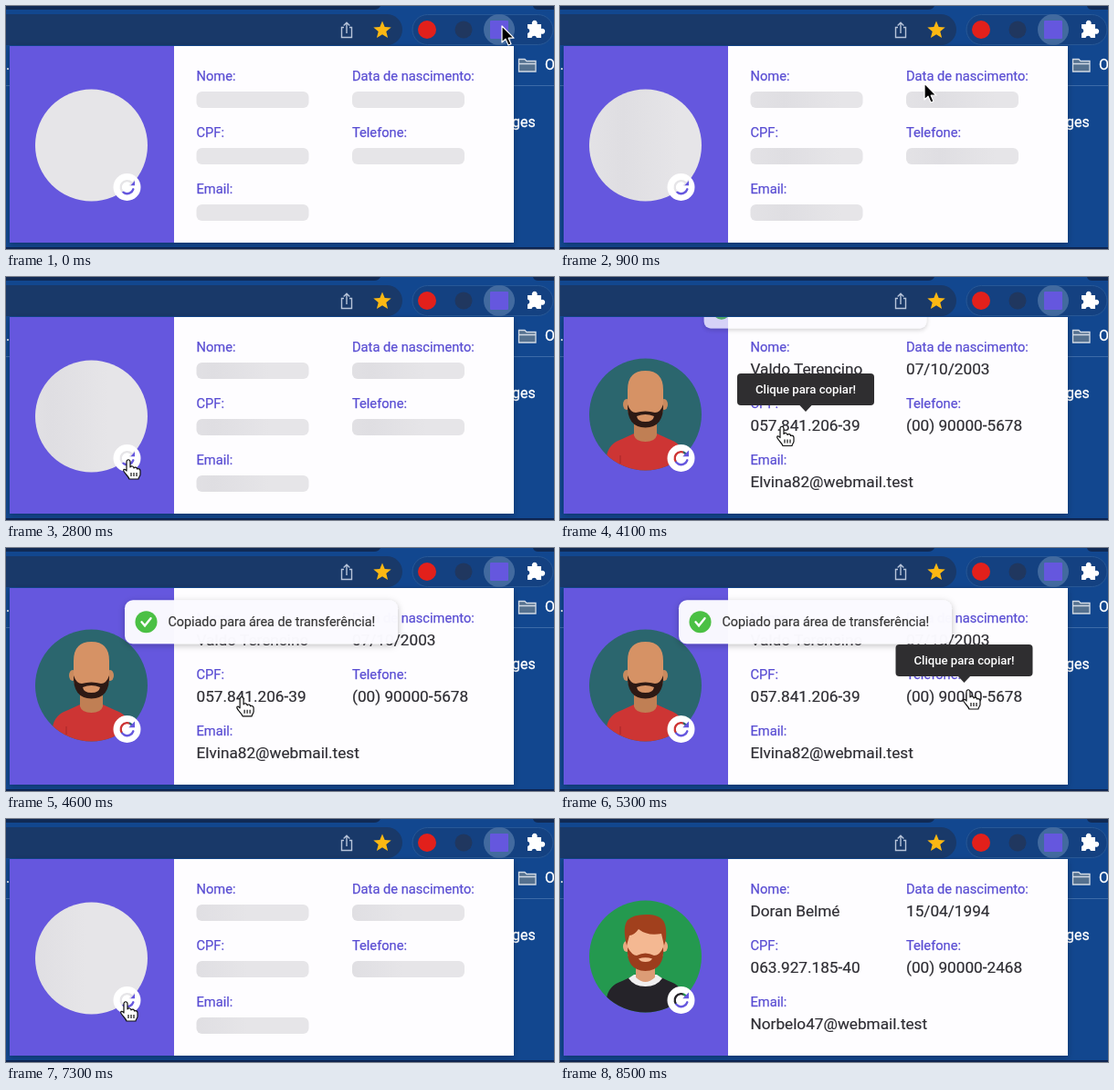
Recreate the animation shown at these times as an HTML page. Size 600x267 px, loop 8.6 s.

```html
<!DOCTYPE html>
<html lang="pt-BR">
<head>
<meta charset="utf-8">
<title>Gerador de dados</title>
<style>
  html, body { margin: 0; width: 100%; height: 100%; overflow: hidden; background: #12478f; }
  svg { display: block; width: 100vw; height: 100vh; font-family: Roboto, sans-serif; }
  .label { font-size: 14.67px; fill: #5a4ed3; stroke: #5a4ed3; stroke-width: .25px; }
  .value { font-size: 17.2px; fill: #2e2d33; stroke: #2e2d33; stroke-width: .2px; }
  .page { font: 16px Roboto, sans-serif; fill: #fff; stroke: #fff; stroke-width: .3px; }
</style>
</head>
<body>
<svg viewBox="0 0 600 267">
  <defs>
    <clipPath id="avatarClip"><circle cx="93.5" cy="151" r="61.5"/></clipPath>
    <clipPath id="popupClip"><rect x="4" y="44" width="552" height="216"/></clipPath>
    <mask id="reloadMask">
      <circle cx="132.5" cy="199" r="15" fill="#fff"/>
      <path d="M139.3 201.3A7 7 0 1 1 137.6 194.2" fill="none" stroke="#000" stroke-width="2.4" stroke-linecap="round"/>
      <path d="M141 190.500V197.200H134.300Z"/>
    </mask>
    <linearGradient id="shimmer">
      <stop stop-color="#e6e5e8"/><stop offset=".5" stop-color="#dfdee2"/><stop offset="1" stop-color="#e6e5e8"/>
    </linearGradient>
    <filter id="shadow" x="-20%" y="-40%" width="140%" height="200%">
      <feDropShadow dx="0" dy="2" stdDeviation="3.5" flood-color="#000" flood-opacity=".25"/>
    </filter>
    <!-- shoulders take the current colour -->
    <path id="torso" d="M51 215V197Q53 183 68 178L81 172H106L119 178Q134 183 136 197V215Z" fill="currentColor"/>
    <g id="sweater">
      <use href="#torso"/>
      <path d="M81 171L75 175Q81 184 93.500 184Q106 184 112 175L106 171Z" fill="#f1eff0"/>
    </g>
  </defs>

  <!-- browser chrome -->
  <rect width="600" height="267" fill="#12478f"/>
  <path d="M0 0H410Q408 4 403 4H0ZM577 0H600V4H583Q578 4 577 0Z" fill="#102a55"/>
  <rect x="-30" y="9" width="464" height="34" rx="17" fill="#193969"/>
  <rect x="445" y="9.5" width="154" height="33" rx="16.5" fill="#144181" stroke="#285896"/>
  <path d="M370 23.500H367.500V34.500H378.500V23.500H376M373 30V18.500M369.700 21.500L373 18.200L376.300 21.500" fill="none" stroke="#b7c4d9" stroke-width="1.4"/>
  <path d="M412 16.500L414.700 23L421.700 23.500L416.300 28L418.100 35L412 31.200L405.900 35L407.700 28L402.300 23.500L409.300 23Z" fill="#fcb813"/>
  <circle cx="461" cy="26" r="10" fill="#e2201b"/>
  <circle cx="501" cy="26" r="9.500" fill="#20375f"/>
  <circle cx="540" cy="26" r="17" fill="#426a9f"/>
  <rect x="530" y="16" width="20" height="20" rx="1" fill="#6557de"/>
  <path d="M572 20H576A3 3 0 1 1 581.500 20H586V25A3 3 0 1 1 586 30.500V35H581A2.800 2.800 0 0 0 575.500 35H571V30A2.800 2.800 0 0 0 571 24.500V20Z" fill="#fff"/>
  <path d="M0 87.500H600" stroke="#3d6ba8"/>
  <path d="M561.500 72V58.500H568L570 60.500H580V72ZM561.500 63.500H580" fill="#55718f" stroke="#d2dae5" stroke-width="1.3"/>
  <text class="page" x="590" y="70">O</text>
  <text class="page" x="554" y="133">ges</text>
  <text class="page" x="0" y="70">.</text>
  <rect y="265" width="600" height="2" fill="#0d2552"/>

  <!-- popup -->
  <rect x="4" y="44" width="552" height="216" fill="#fefdff" filter="url(#shadow)"/>
  <rect x="4" y="44" width="180" height="216" fill="#6557de"/>
  <g id="labels"></g>
  <g id="skeleton" fill="url(#shimmer)"></g>
  <g id="values"></g>

  <g clip-path="url(#avatarClip)">
    <g class="avatar">
      <rect x="30" y="88" width="128" height="128" fill="#2b666e"/>
      <use href="#sweater" color="#221815"/>
      <path d="M83 155H104V174Q93.500 184 83 174Z" fill="#d98d5c"/>
      <ellipse cx="74" cy="142" rx="4" ry="6" fill="#e59f6c"/><ellipse cx="113" cy="142" rx="4" ry="6" fill="#e59f6c"/>
      <path d="M75 118H112V146Q108 169 93.500 169Q79 169 75 146Z" fill="#f0ab78"/>
      <path d="M74 138Q66 124 70 114L67 112L74 107L71 103L80 103L82 96L89 100L96 95L98 100L108 98L108 104L116 106L114 110L120 115L116 119Q118 129 113 138L110 126L104 130L99 123L92 130L87 124L77 130Z" fill="#221713"/>
      <g fill="#f3c09a" stroke="#5b3a27" stroke-width="1.500"><circle cx="85" cy="140" r="6.500"/><circle cx="102.500" cy="140" r="6.500"/><path d="M91.500 139Q93.700 137.500 96 139M75 138H79M109 138H113"/></g>
    </g>
    <g class="avatar">
      <rect x="30" y="88" width="128" height="128" fill="#2b666e"/>
      <use href="#torso" color="#cd3534"/>
      <path d="M81 155H106V174Q104 181 93.500 181Q83 181 81 174Z" fill="#c07f54"/>
      <ellipse cx="73" cy="140" rx="4" ry="6" fill="#c98a5e"/><ellipse cx="114" cy="140" rx="4" ry="6" fill="#c98a5e"/>
      <path d="M74 124Q74 103 93.500 103Q113 103 113 124V146Q109 165 93.500 165Q78 165 74 146Z" fill="#d69265"/>
      <path d="M74 140Q77 149 83 149Q93.500 146 104 149Q110 149 113 140Q114 165 93.500 165.500Q73 165 74 140Z" fill="#2d1914"/>
      <path d="M84 153Q93.500 149 103 153Q102 159 93.500 159Q85 159 84 153Z" fill="#d69265"/>
      <path d="M66 205V196M121 205V196" stroke="#a82729"/>
    </g>
    <g class="avatar">
      <rect x="30" y="88" width="128" height="128" fill="#24994f"/>
      <use href="#sweater" color="#252329"/>
      <path d="M83 155H104V174Q93.500 184 83 174Z" fill="#dc9c76"/>
      <ellipse cx="73" cy="140" rx="4" ry="6" fill="#eaa982"/><ellipse cx="114" cy="140" rx="4" ry="6" fill="#eaa982"/>
      <path d="M74 120H113V149Q107 165 93.500 165Q80 165 74 149Z" fill="#f4b892"/>
      <path d="M73 139Q68 119 74 111Q81 104 98 105Q115 106 116 121Q117 131 114 139L111 126Q96 129 86 121Q81 128 76 128Z" fill="#a1401d"/>
      <path d="M74 141Q79 150 84 150Q93.500 145 103 150Q109 150 113 141Q115 166 93.500 167Q72 166 74 141Z" fill="#9b3d1c"/>
      <path d="M86 153.500Q93.500 151 101 153.500Q99 157 93.500 157Q88 157 86 153.500Z" fill="#f4b892"/>
    </g>
  </g>
  <rect x="117" y="184" width="31" height="31" fill="#fff" mask="url(#reloadMask)"/>

  <!-- overlays -->
  <g clip-path="url(#popupClip)">
    <g id="toast">
      <rect x="-149.500" y="-24" width="299" height="48" rx="9" fill="#fbfaff" fill-opacity=".98" filter="url(#shadow)"/>
      <circle cx="-126" cy="0" r="12" fill="#4bc044"/>
      <path d="M-131 0L-127.500 4L-121 -4" fill="none" stroke="#fff" stroke-width="2.400" stroke-linecap="round"/>
      <text x="-102" y="4.500" font-size="14.350" fill="#363636" stroke="#363636" stroke-width=".2">Copiado para área de transferência!</text>
    </g>
  </g>
  <g id="tooltip">
    <rect x="-75" y="106" width="150" height="35" rx="4" fill="#2f2e30"/>
    <path d="M-7 140.500H7L0 148Z" fill="#2f2e30"/>
    <text y="127.800" font-size="13.150" font-weight="500" fill="#fff" text-anchor="middle">Clique para copiar!</text>
  </g>
  <g id="cursor" stroke-linejoin="round">
    <path id="arrow" d="M0 0V18L4 14.200L7 21L10 19.700L7.200 13.200H13Z" stroke="#fff" stroke-width="1.200"/>
    <path id="hand" d="M-2 2C-2 -1 2 -1 2 2V8C3 6 6 7 6 9C7 7.500 9.500 8 9.500 10C11 9 13 10 13 12V16C13 18 11 19 11 21H1C0 18 -3 16 -5 12.500C-6 10 -4 9.500 -2 12ZM3 14V18M6 14V18M9 14V18" fill="#fff" stroke="#111" stroke-width="1.200"/>
  </g>
</svg>
<script>
const LOOP = 8600, STEP = 100;
const $ = id => document.getElementById(id);
const show = (el, visible) => el.style.display = visible ? '' : 'none';
const clamp = x => Math.max(0, Math.min(1, x));
const smooth = p => p * p * (3 - 2 * p);

const fields = [
  ['Nome:', 208.5, 82], ['Data de nascimento:', 379, 82],
  ['CPF:', 208.5, 144], ['Telefone:', 379, 144], ['Email:', 208.5, 206]
];
const people = [
  ['Marlino Endaro', '28/06/1987', '048.216.930-57', '(00) 90000-1234', 'Nomira.Gandon@email.test'],
  ['Valdo Terencino', '07/10/2003', '057.841.206-39', '(00) 90000-5678', 'Elvina82@webmail.test'],
  ['Doran Belmé', '15/04/1994', '063.927.185-40', '(00) 90000-2468', 'Norbelo47@webmail.test']
];
// [start, person]; -1 means loading
const states = [[0, -1], [1000, 0], [2300, -1], [3300, 1], [6900, -1], [7800, 2]];
// cursor hotspot: [time, x, y]
const path = [
  [0, 543, 22], [500, 543, 22], [1500, 134, 201], [3300, 134, 201],
  [3800, 243, 164.5], [4500, 243, 164.5], [5100, 447, 156], [5600, 447, 156],
  [6400, 131, 201], [7500, 131, 201], [8100, 620, 120], [LOOP, 620, 120]
];
// [start, end, centre x]
const tips = [[3700, 4600, 269], [4900, 5750, 442.5]];
const TOAST_IN = 4050, TOAST_OUT = 6050;

$('labels').innerHTML = fields.map(([text, x, y]) =>
  `<text class="label" x="${x}" y="${y}">${text}</text>`).join('');
$('values').innerHTML = fields.map(([, x, y]) =>
  `<text class="value" x="${x}" y="${y + 25.4}"></text>`).join('');
$('skeleton').innerHTML = '<circle cx="93.5" cy="153" r="61.5"/>' + fields.map(([, x, y]) =>
  `<rect x="${x}" y="${y + 12}" width="123" height="18" rx="6"/>`).join('');
const valueTexts = [...$('values').children];
const avatars = document.querySelectorAll('.avatar');

function drawProfile(t) {
  const [start, person] = states.findLast(s => s[0] <= t);
  show($('skeleton'), person < 0);
  avatars.forEach((avatar, i) => show(avatar, i === person));
  valueTexts.forEach((el, i) => el.textContent = person < 0 ? '' : people[person][i]);
  const shift = ((t - start) % 1000) / 1000 * 2 - 1.35;
  $('shimmer').setAttribute('gradientTransform', `translate(${start ? shift : shift - .65})`);
}

function drawCursor(t) {
  const i = path.findLastIndex(k => k[0] <= t);
  const [t0, x0, y0] = path[i], [t1, x1, y1] = path[i + 1];
  const p = smooth((t - t0) / (t1 - t0));
  const x = x0 + (x1 - x0) * p, y = y0 + (y1 - y0) * p;
  const overReload = Math.hypot(x - 132.5, y - 199) < 16;
  const overValue = y > 152 && y < 176 && (x > 208 && x < 328 || x > 379 && x < 506);
  $('cursor').setAttribute('transform', `translate(${x} ${y})`);
  show($('hand'), overReload || overValue);
  show($('arrow'), !(overReload || overValue));
}

function drawTooltip(t) {
  const tip = tips.find(([from, to]) => t >= from && t < to);
  show($('tooltip'), tip);
  if (!tip) return;
  $('tooltip').setAttribute('transform', `translate(${tip[2]})`);
  $('tooltip').setAttribute('opacity', clamp(Math.min(t - tip[0], tip[1] - t) / 150));
}

function drawToast(t) {
  const entered = 1 - (1 - clamp((t - TOAST_IN) / 350)) ** 5;
  const left = 1 - (1 - clamp((t - TOAST_OUT) / 400)) ** 3;
  const dy = -96 * (1 - entered) - 72 * left;
  const scale = 1 - .4 * (1 - entered + left);
  show($('toast'), entered > 0 && left < 1);
  $('toast').setAttribute('transform', `translate(279.5 ${81.3 + dy}) scale(${scale})`);
  $('toast').setAttribute('opacity', (.5 + .5 * entered) * (1 - left));
}

function frame(now) {
  const t = Math.floor(now % LOOP / STEP) * STEP;
  drawProfile(t);
  drawCursor(t);
  drawTooltip(t);
  drawToast(t);
  requestAnimationFrame(frame);
}
frame(0);
</script>
</body>
</html>
```
